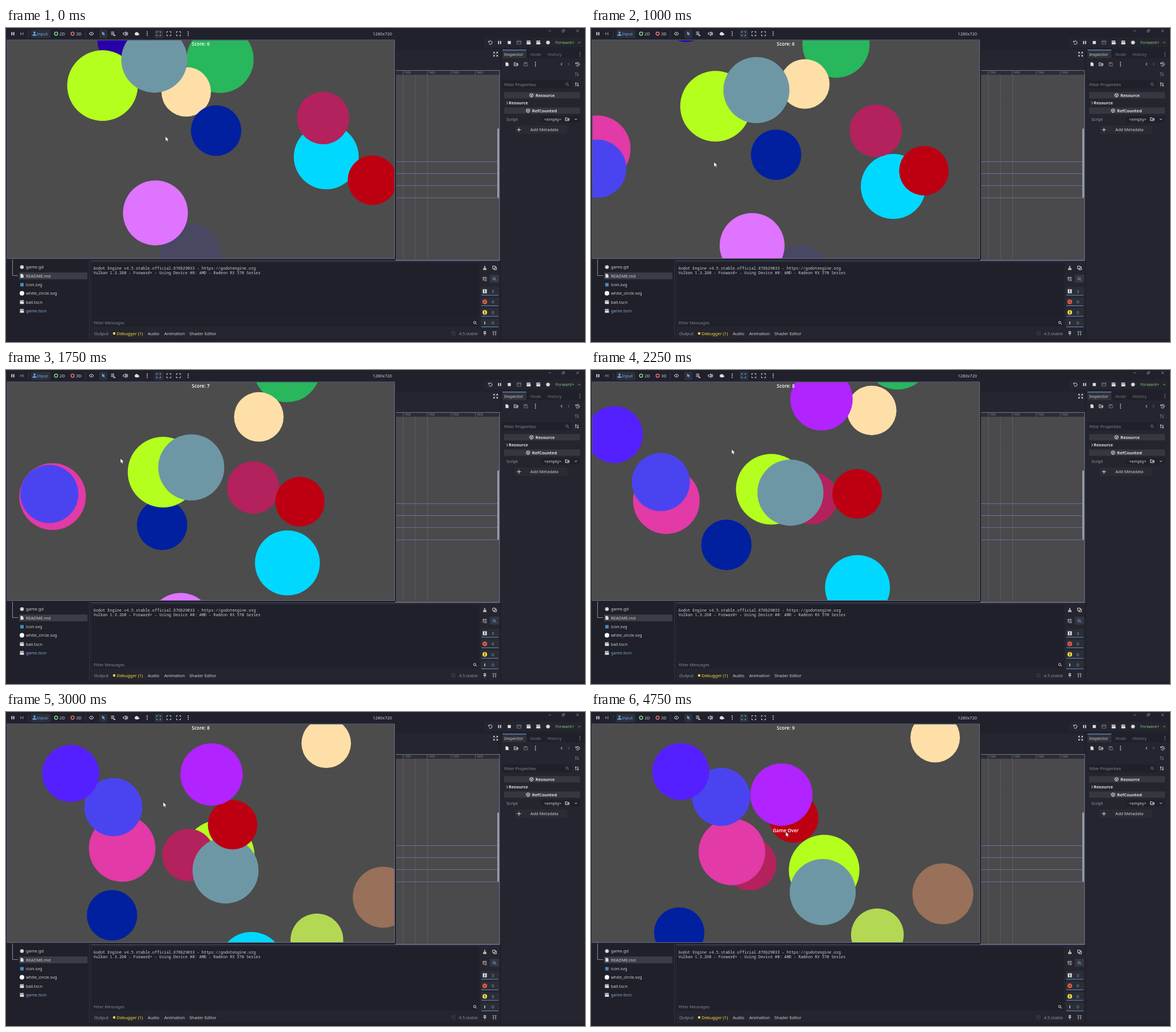
These frames come from a looping animation (1017 px wide and 551 px high, 5 s). An HTML page:

```html
<!DOCTYPE html>
<html lang="en">
<head>
<meta charset="utf-8">
<title>Ball game in the editor</title>
<style>
html, body { margin: 0; width: 100%; height: 100%; overflow: hidden; background: #20212b; }
svg { display: block; width: 1017px; height: 551px; }
text { font-family: "Noto Sans", sans-serif; font-size: 7.45px; fill: #cdcfd4; white-space: pre; }
.mono { font-family: "Noto Sans Mono", monospace; font-size: 6.9px; }
.game { font-family: "Open Sans", sans-serif; font-size: 8.4px; font-weight: 600; fill: #fff; text-anchor: middle; }
.bold { font-weight: 700; }
</style>
</head>
<body>
<svg id="stage" viewBox="0 0 1017 551" xmlns="http://www.w3.org/2000/svg"></svg>
<script>
const LOOP = 5000, STEP = 250;
const INK = '#dcdee2', DIM = '#74767e', BLUE = '#70a8f0';
const BASE = '#20212b', PANEL = '#24252e', FIELD = '#1f2029';

const rect = (x, y, w, h, fill, more = '') =>
  `<rect x="${x}" y="${y}" width="${w}" height="${h}" fill="${fill}" ${more}/>`;
const line = (x1, y1, x2, y2, color, w = 1) =>
  `<path d="M${x1} ${y1}L${x2} ${y2}" stroke="${color}" stroke-width="${w}"/>`;
const dot = (x, y, r, fill) => `<circle cx="${x}" cy="${y}" r="${r}" fill="${fill}"/>`;
const ring = (x, y, r, color, w = 1.3) =>
  `<circle cx="${x}" cy="${y}" r="${r}" fill="none" stroke="${color}" stroke-width="${w}"/>`;
// y is the middle of the capitals
const label = (x, y, s, fill = '#cdcfd4', cls = '', anchor = 'start') =>
  `<text x="${x}" y="${y + 2.7}" class="${cls}" style="fill:${fill};text-anchor:${anchor}">${s}</text>`;

// Icons on a 10 x 10 grid centred on 0,0: [path, filled]
const ICONS = {
  pause: ['M-2.6-2.8h1.8v5.6h-1.8zM.8-2.8h1.8v5.6h-1.8z', 1],
  next: ['M-3-2.6L.5 0L-3 2.6zM1-2.6h1.6v5.2H1z', 1],
  stop: ['M-2.7-2.7h5.4v5.4h-5.4z', 1],
  arrow: ['M-2.6-3.4L3-.6L.6.3L2.6 2.6L1.5 3.4L-.5 1L-1.6 2.8z', 1],
  list: ['M-3.5-3h5.5M-3.5-.8h5.5M-3.5 1.4h3.5M1 .3v3.2h3z', 0],
  sound: ['M-4-1.4h1.8L.4-3.4v6.8L-2.2 1.4H-4zM1.4-2Q3 0 1.4 2M2.6-3.2Q5.2 0 2.6 3.2', 0],
  cam: ['M-4-1h1a2 2 0 0 1 3.3-1.4A2 2 0 0 1 2.6.2L4-.6v3L2.4 1.8V3h-5V1.8H-4z', 1],
  dots: ['M-.8-4h1.6v1.7h-1.6zM-.8-.8h1.6v1.7h-1.6zM-.8 2.4h1.6v1.7h-1.6z', 1],
  frame: ['M-3.6-1.4v-2.2h2.2M1.4-3.6h2.2v2.2M3.6 1.4v2.2H1.4M-1.4 3.6h-2.2V1.4', 0],
  eye: ['M-4 0Q0-5.2 4 0Q0 5.2-4 0zM-1 0h2', 0],
  joy: ['M-3.4 1.2h6.8v2.2h-6.8zM-.7 1V-1.4h1.4V1zM-1.7-3.6h3.4v2.6h-3.4z', 1],
  reload: ['M-2.8 1.6A3 3 0 1 0-2.4-1.9M-3.4-3v2.2h2.2', 0],
  clap: ['M-3.5-1h7v4.2h-7zM-3.6-3.2L3-3.6l.4 1.7L-3.4-1.4z', 1],
  film: ['M-3.5-2.8h7v5.6h-7zM-3.5-1h7', 0],
  expand: ['M1-1L3.6-3.6M1.4-3.6h2.2v2.2M-1 1L-3.6 3.6M-3.6 1.4v2.2h2.2M1 1L3.6 3.6M3.6 1.4v2.2H1.4M-1-1L-3.6-3.6M-3.6-1.4v-2.2h2.2', 0],
  file: ['M-2.6-3.3h3.3L2.7-1.2v4.5h-5.3z', 1],
  folder: ['M-3.5-2.6h2.8l1 1.2h2.5v4h-6.3zM-1.6.4h5.6', 0],
  save: ['M-3-3h5l1 1v5h-6zM-1.4-3v2.2h2.6V-3', 0],
  left: ['M1-2.4L-1.4 0L1 2.4', 0],
  right: ['M-1-2.4L1.4 0L-1 2.4', 0],
  down: ['M-2-.9L0 1.1L2-.9', 0],
  history: ['M-2.8 1.6A3.2 3.2 0 1 0-2.4-1.9M-3.4-3v2.2h2.2M0-1.6V.4h1.6', 0],
  search: ['M2.9 2.9L.9.9M-2.7-.7a2 2 0 1 0 4 0a2 2 0 1 0-4 0', 0],
  tune: ['M-2-3.2v6.4M-3-1.4L-2-3.2L-1-1.4M1.6-3.2v6.4M.6 1.4L1.6 3.2l1-1.8', 0],
  cube: ['M0-3.3L3-1.6v3.3L0 3.4L-3 1.7v-3.3zM-3-1.6L0 0L3-1.6M0 0v3.3', 0],
  plus: ['M-3.5 0h7M0-3.5v7', 0],
  gear: ['M-.8-3.6h1.6v1.5L2.2-2.9l.9.9L2.2-.8h1.4v1.6H2.2l.9 1.3-.9.9L.8 2.2v1.4H-.8V2.2L-2.2 3l-.9-.9L-2.2.8h-1.4V-.8h1.4L-3.1-2l.9-.9L-.8-2.1z', 1],
  brush: ['M-.8-3.4h1.6v3h-1.6zM-2.6 0h5.2v1.2h-5.2zM-3 1.8h6v1.6h-6z', 1],
  copy: ['M-3.2-3.2h4.4v4.4h-4.4zM-1.2 1.2v2h4.6v-4.6H1.2', 0],
  tree: ['M-3.5-2.8h7M-1 0h4.5M-1 2.8h4.5M-2.8-2.8v5.6', 0],
  pin: ['M-2-3.4h4M-1.2-3.4v3h2.4v-3M-2.5 0h5M0 0v3.4', 0],
  up: ['M-3.5-3h3M.5-3h3M-2 3.4v-5M2 3.4v-5', 0],
  cross: ['M-2.2-2.2L2.2 2.2M2.2-2.2L-2.2 2.2', 0],
  box: ['M-2.2-1h3.2v3.2h-3.2zM-1-2.2h3.2v3.2', 0],
  minus: ['M-2.4 0h4.8', 0]
};
const icon = (name, x, y, color = INK) => {
  const [d, filled] = ICONS[name];
  const paint = filled ? `fill="${color}"` : `fill="none" stroke="${color}" stroke-width="1"`;
  return `<path transform="translate(${x} ${y})" d="${d}" ${paint}/>`;
};
const icons = (y, rows) => rows.map(([n, x, c]) => icon(n, x, y, c)).join('');

function editor() {
  let s = rect(0, 0, 1017, 551, BASE);

  // Run buttons and window controls
  s += rect(840, 17, 172, 17, PANEL, 'rx="2"');
  s += icons(5, [['minus', 955, DIM], ['box', 979, DIM], ['cross', 1004, DIM]]);
  s += icons(25.5, [['reload', 851], ['pause', 867], ['stop', 884], ['film', 901, DIM],
    ['clap', 918], ['clap', 935], ['gear', 952], ['down', 1007, '#7fc66f']]);
  s += label(965, 25.5, 'Forward+', '#7fc66f');

  // Canvas viewport behind the game
  s += rect(684, 38, 183, 369, PANEL) + icon('expand', 860, 46);
  s += rect(684, 74, 183, 333, '#4a4a4d') + rect(684, 74, 183, 8, '#2b2c34');
  for (let i = 0; i < 4; i++) {
    const x = 697.5 + i * 42.3;
    s += line(x, 74, x, 82, '#777a82', .7);
    s += `<text x="${x + 2}" y="79.5" style="font-size:5px;fill:#8c8f96">${1300 + i * 100}</text>`;
  }
  for (const x of [698, 719, 740.5]) s += line(x, 82, x, 406, '#66666c', .7);
  for (const y of [234.5, 255.5, 276.5, 298]) s += line(685, y, 866, y, '#7272a4', .9);
  s += line(685, 130, 866, 130, '#573f46', .8);
  s += rect(684.5, 74.5, 182.5, 333, 'none', 'stroke="#73799b" stroke-width="1"');
  s += rect(863, 176, 3, 122, '#9a9ca6', 'rx="1.5"');

  // Inspector
  s += rect(870, 38, 147, 508, PANEL) + rect(870, 38, 147, 15, FIELD);
  s += rect(872, 38, 42, 15, '#30323a') + line(872, 38.7, 914, 38.7, BLUE);
  s += label(875, 46, 'Inspector') + label(921, 46, 'Node', DIM) + label(951, 46, 'History', DIM);
  s += icon('dots', 1008, 46, DIM);
  s += icons(63.5, [['file', 880], ['folder', 896], ['save', 913, DIM], ['dots', 930],
    ['left', 976], ['right', 988, DIM], ['history', 1004]]);
  s += icon('tune', 1003, 81, DIM);
  s += rect(872, 92, 121, 14, FIELD, 'rx="2"') + label(875, 99, 'Filter Properties', '#858890');
  s += icon('search', 986, 99, DIM) + icon('tune', 1003, 99);
  for (const [y, name, x] of [[118, 'Resource', 930], [145, 'RefCounted', 924]])
    s += rect(875, y - 5.5, 133, 11, '#363840') + icon('cube', x - 7, y) + label(x, y, name, INK, 'bold');
  s += icon('right', 880, 131.5) + label(883, 131.5, 'Resource', INK, 'bold');
  s += label(879, 160, 'Script', '#9a9da5') + rect(940, 154, 68, 12, FIELD);
  s += label(945, 160, '&lt;empty&gt;') + icon('folder', 986, 160) + icon('down', 1001, 160);
  s += rect(894, 171, 92, 15, '#2a2c34', 'rx="2"') + icon('plus', 901, 178.5) + label(921, 178.5, 'Add Metadata');

  // File list
  s += rect(4, 400, 142, 145, FIELD) + line(146.5, 405, 146.5, 545, '#30334a');
  s += rect(23, 429, 120, 12, '#3a3d45');
  s += `<path d="M11.5 405V434.5H21" fill="none" stroke="#8c8f99"/>`;
  const files = [['game.gd', 'gear'], ['README.md', 'file'], ['icon.svg', ''],
    ['white_circle.svg', ''], ['ball.tscn', 'clap'], ['game.tscn', 'clap']];
  files.forEach(([name, glyph], i) => {
    const y = 419.5 + i * 15.4;
    if (glyph) s += icon(glyph, 28, y);
    s += label(35, y, name, i === 5 ? '#83a9da' : '#cdcfd4');
  });
  s += rect(25, 447.5, 6, 6, '#478cbf') + dot(28, 465.5, 4, '#fff');

  // Output panel
  s += rect(149, 409, 718, 136, PANEL) + rect(151, 412, 680, 98, FIELD);
  s += line(149, 408.5, 867, 408.5, '#4a4d66');
  s += label(153.5, 421, 'Godot Engine v4.5.stable.official.876b29033 - https://godotengine.org', '#cdcfd4', 'mono');
  s += label(153.5, 429, 'Vulkan 1.3.260 - Forward+ - Using Device #0: AMD - Radeon RX 570 Series', '#cdcfd4', 'mono');
  s += rect(151, 511, 680, 13, FIELD) + label(154, 517.5, 'Filter Messages', '#858890') + icon('search', 824, 517.5);
  s += icon('brush', 841, 421) + icon('copy', 858, 421) + icon('tree', 841, 440.5);
  s += rect(850, 433, 16, 14, '#343740') + icon('search', 858, 440.5, BLUE);
  [462, 480.5, 499, 517.5].forEach((y, i) => {
    s += rect(834, y - 7.5, 32, 15, '#2b2e37', 'rx="1.5"') + line(835, y + 7, 865, y + 7, BLUE, .8);
    s += i ? (i < 3 ? dot(841, y, 4, ['', '#ff6047', '#ffde42'][i]) : '') : rect(837.5, y - 3.5, 7, 7, '#e2e4e8');
    s += i === 1 ? icon('cross', 841, y, '#26282f') : line(841, y - 2.5, 841, y + 2.5, i === 3 ? INK : '#26282f', 1.4);
    s += label(853, y, i ? 0 : 3, '#8fa2bd');
  });
  s += label(155, 536, 'Output', '#92959d') + dot(190, 536, 2.2, '#ffde42') + label(194.5, 536, 'Debugger (1)', '#ffde42');
  s += label(249, 536, 'Audio') + label(278, 536, 'Animation') + label(322, 536, 'Shader Editor');
  s += icon('tree', 786, 536, '#444750') + label(829, 536, '4.5.stable', '#8c8f97', '', 'end');
  s += icon('pin', 841, 536) + icon('up', 858, 536);
  return s;
}

function gameBar() {
  let s = rect(0, 0, 685, 406, BASE);
  s += rect(44, 3, 34, 15, '#2c3039', 'rx="2"') + rect(164, 3, 14, 15, '#2c3039', 'rx="2"') + rect(261, 3, 15, 15, '#2c3039', 'rx="2"');
  s += icons(10, [['pause', 12], ['next', 28, DIM], ['joy', 50, BLUE], ['eye', 150], ['arrow', 171, BLUE],
    ['list', 188], ['sound', 210], ['cam', 230], ['dots', 248], ['frame', 268, BLUE],
    ['frame', 286], ['frame', 303], ['dots', 320]]);
  s += line(39.5, 4, 39.5, 17, '#363943') + line(139.5, 4, 139.5, 17, '#363943');
  s += label(54.5, 10, 'Input', BLUE) + ring(88, 10, 2.8, '#8eef97') + label(94, 10, '2D');
  s += ring(117, 10, 2.8, '#fc7f7f') + label(123, 10, '3D') + label(678, 10, '1280x720', '#cdcfd4', '', 'end');
  return s;
}

// [colour, radius, x and y at the start, x and y at game over, birth ms], back to front
const BALLS = [
  ['#484863', 54, 324, 397, 539, 582, 0],
  ['#2800a8', 45.5, 206, 22, 16, -188, 0],
  ['#28b75c', 59, 376, 55, 641, -75, 0],
  ['#ffdfa8', 43.5, 316.5, 112, 604.5, 45, 0],
  ['#0120a0', 44.3, 369, 180, 155, 387, 0],
  ['#b4ff1e', 62, 169.5, 101, 409.5, 277.5, 0],
  ['#00d8ff', 57, 562.5, 226, 408.5, 480, 0],
  ['#b3225c', 46, 557, 158, 280, 267, 0],
  ['#6e97a6', 58, 260.5, 55.5, 407, 316, 0],
  ['#bc0012', 43.5, 643.8, 267, 356, 186, 0],
  ['#de74ff', 57, 262.5, 324.4, 362.5, 604, 0],
  ['#e23aa6', 58.5, -50, 203.5, 247.5, 245.5, 1000],
  ['#4a44f0', 51, -45, 272, 228.5, 149, 1000],
  ['#b124ff', 54.7, 516.5, -97, 334.5, 145, 2000],
  ['#5520ff', 50, -143.5, 127.5, 157.5, 104.5, 2000],
  ['#99705a', 53.5, 923, 360, 618, 319, 3000],
  ['#b3d954', 46.3, 798, 453, 503, 391, 3000]
];

// [ms, progress] and [ms, x, y]
const PACE = [[0, 0], [750, .125], [1000, .205], [1750, .443], [2500, .698], [3000, .854], [3250, .934], [3500, 1]];
const MOUSE = [[0, 280, 190], [1000, 216, 235], [1750, 201, 155], [2500, 270, 131],
  [3000, 276, 158], [3500, 289, 204], [4500, 342, 210]];

function sample(keys, t) {
  const i = keys.findIndex(k => k[0] > t);
  if (i < 0) return keys[keys.length - 1].slice(1);
  const a = keys[i - 1], b = keys[i], f = (t - a[0]) / (b[0] - a[0]);
  return a.slice(1).map((v, n) => v + (b[n + 1] - v) * f);
}

const stage = document.getElementById('stage');
stage.innerHTML = `<clipPath id="view">${rect(2.5, 21.5, 679.5, 382.5, '#000')}</clipPath>` +
  editor() + gameBar() +
  `<g clip-path="url(#view)">${rect(2, 21, 681, 384, '#4c4c4c')}` +
  `<g id="balls">${BALLS.map(([color, r]) => dot(0, 0, r, color)).join('')}</g>` +
  `<text id="score" class="game" x="342" y="31.2"></text>` +
  `<text id="over" class="game" x="342" y="211.4">Game Over</text></g>` +
  rect(2, 21, 680.5, 383.5, 'none', 'stroke="#646b8c" stroke-width="1"') +
  `<path id="mouse" d="M0 0V8.6L2 6.8L3.4 9.8L4.8 9.2L3.5 6.3H6.1z" fill="#fff" stroke="#222" stroke-width=".5"/>`;

const [balls, score, over, mouse] = ['balls', 'score', 'over', 'mouse'].map(id => document.getElementById(id));

function draw(t) {
  const [p] = sample(PACE, t), [mx, my] = sample(MOUSE, t);
  BALLS.forEach(([, , x0, y0, x1, y1, birth], i) => {
    const el = balls.children[i];
    el.setAttribute('cx', x0 + (x1 - x0) * p);
    el.setAttribute('cy', y0 + (y1 - y0) * p);
    el.style.display = t < birth ? 'none' : '';
  });
  // One point per second, from 1250 ms until game over
  const points = Math.max(0, Math.floor((t - 250) / 1000));
  score.textContent = 'Score: ' + Math.min(9, 6 + points);
  over.style.display = t < 3500 ? 'none' : '';
  mouse.setAttribute('transform', `translate(${mx} ${my})`);
}

const start = performance.now();
function tick() {
  const t = (performance.now() - start) % LOOP;
  draw(Math.floor(t / STEP) * STEP);
  requestAnimationFrame(tick);
}
tick();
</script>
</body>
</html>
```
